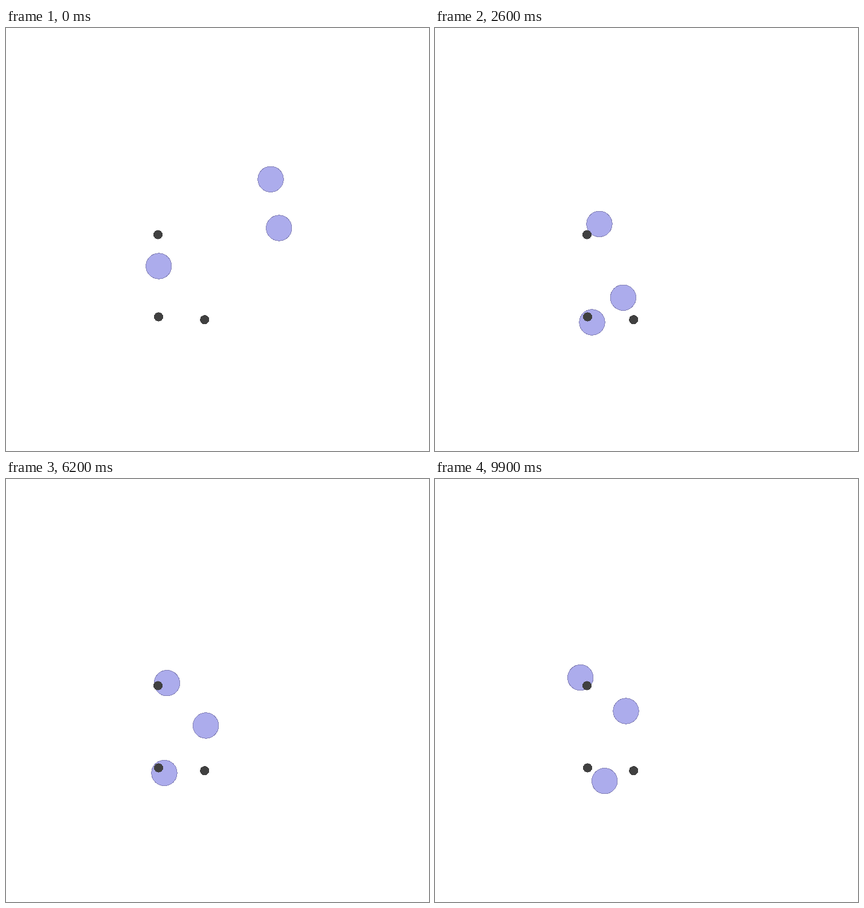
These frames come from a looping animation (700 px wide and 700 px high, 10 s). An HTML page:

```html
<!DOCTYPE html>
<html lang="en">
<head>
<meta charset="utf-8">
<title>Three agents, three landmarks</title>
<style>
  html, body { margin: 0; width: 100%; height: 100%; overflow: hidden; background: #fff; }
  svg { display: block; width: 100%; height: 100%; shape-rendering: crispEdges; }
  .agent { fill: #acacec; stroke: #8583b8; stroke-width: 1; }
  .landmark { fill: #404040; }
</style>
</head>
<body>
<svg viewBox="0 0 700 700">
  <circle class="agent" r="21.2"/>
  <circle class="agent" r="21.2"/>
  <circle class="agent" r="21.2"/>
  <circle class="landmark" cx="251.5" cy="342" r="7.6"/>
  <circle class="landmark" cx="252.5" cy="478" r="7.6"/>
  <circle class="landmark" cx="328.7" cy="482.7" r="7.6"/>
</svg>
<script>
const STEP = 100, STEPS = 100;

// Each agent drifts through a few stops and swings aside between them.
const times = [0, 10, 26, 46, 62, 84, 99];
const agents = [
  { x: [438, 312.7, 272, 244.7, 266.4, 246.7, 240.7],
    y: [250.2, 329.6, 324.3, 328, 337.7, 345, 328.6], swing: [-30, 0] },
  { x: [451.8, 331.2, 311.4, 322.6, 330.7, 306.9, 316],
    y: [331, 401, 446.2, 437.3, 408, 408, 384], swing: [7, 0] },
  { x: [252.8, 233.5, 260, 281.8, 262, 294.3, 280.7],
    y: [394, 506.3, 487, 483.5, 486.5, 491, 499.7], swing: [0, 22] }
];

// Slope through the neighbours; agents start and end at rest.
function slope(stops, i) {
  return i > 0 && i < stops.length - 1
    ? (stops[i + 1] - stops[i - 1]) / (times[i + 1] - times[i - 1]) : 0;
}

function position(stops, swing, step) {
  let i = 0;
  while (i < times.length - 2 && step >= times[i + 1]) i++;
  const span = times[i + 1] - times[i], u = (step - times[i]) / span, v = 1 - u;
  const drift = v * v * (1 + 2 * u) * stops[i] + u * u * (3 - 2 * u) * stops[i + 1]
    + span * u * v * (v * slope(stops, i) - u * slope(stops, i + 1));
  return drift + swing * span / 20 * Math.sin(Math.PI * u) ** 2;
}

const circles = document.querySelectorAll(".agent");
const start = performance.now();

function draw() {
  const step = Math.floor((performance.now() - start) / STEP) % STEPS;
  agents.forEach(({ x, y, swing }, i) => {
    circles[i].setAttribute("cx", position(x, swing[0], step).toFixed(2));
    circles[i].setAttribute("cy", position(y, swing[1], step).toFixed(2));
  });
  requestAnimationFrame(draw);
}
draw();
</script>
</body>
</html>
```
